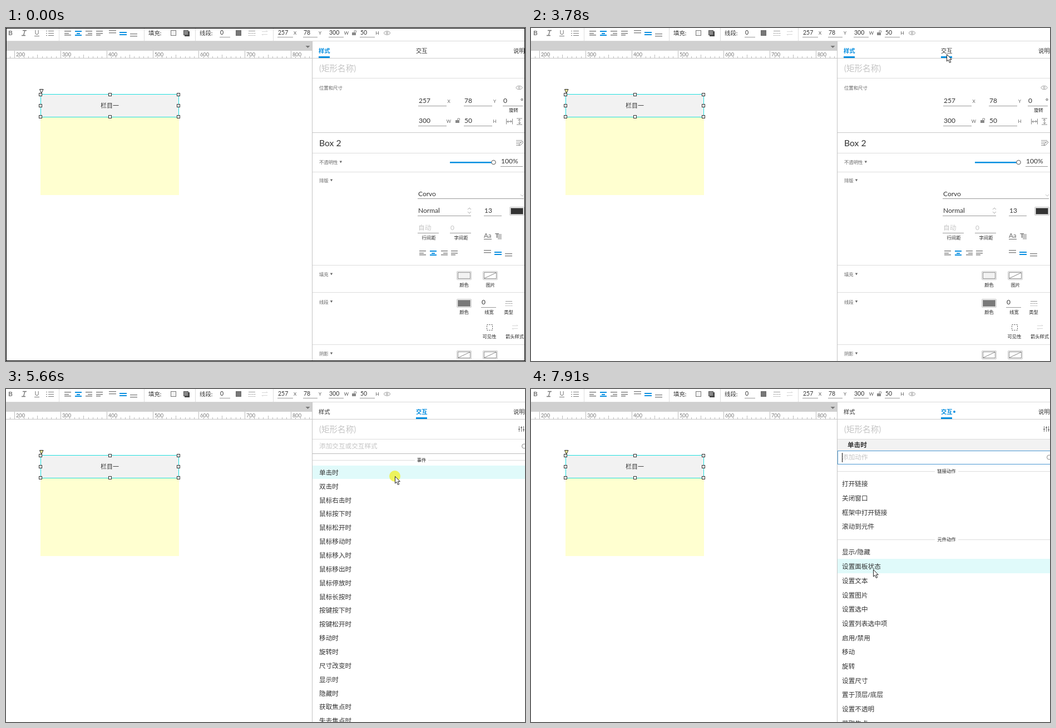
These frames come from a looping animation (933x600 px, 8 s). An HTML page with a canvas:

```html
<!DOCTYPE html>
<html lang="zh">
<head>
<meta charset="utf-8">
<title>交互面板</title>
<style>
html, body { margin: 0; width: 100%; height: 100%; overflow: hidden; background: #fff; }
canvas { display: block; }
</style>
</head>
<body>
<canvas id="stage" width="933" height="600"></canvas>
<script>
const c = document.getElementById('stage').getContext('2d');
const LOOP = 8000, BLUE = '#058ee0', DARK = '#333', GRAY = '#7a7a7a', PALE = '#c4c4c4', HOVER = '#e0fafa';
const CJK = '"Noto Sans CJK SC", "Noto Sans CJK", sans-serif';
const FONT = 'Lato, ' + CJK, LIST_FONT = '"Open Sans", ' + CJK;

// pointer path: time, x, y
const path = [
  [210, 330, 568], [500, 440, 400], [800, 540, 270], [1000, 610, 212], [1060, 667, 217],
  [1230, 667, 217], [1500, 692, 165], [1750, 740, 75], [1920, 761, 44], [2070, 759, 44],
  [2150, 759, 44], [2220, 757, 48], [2300, 755, 52], [2450, 755, 52], [2610, 747, 51],
  [2770, 747, 51], [2840, 747, 53], [2910, 747, 54], [3090, 747, 54], [3160, 747, 51],
  [3710, 747, 51], [3860, 748, 42], [4340, 748, 42], [4560, 741, 88], [4720, 735, 124],
  [4950, 735, 124], [5200, 722, 140], [5490, 699, 157], [5980, 699, 157], [6140, 656, 192],
  [6450, 634, 250], [6700, 618, 312], [6830, 615, 325]
];
const clicks = [[3940, 4090], [4870, 4950], [5660, 5740]];

const events = '单击时 双击时 鼠标右击时 鼠标按下时 鼠标松开时 鼠标移动时 鼠标移入时 鼠标移出时 鼠标停放时 鼠标长按时 按键按下时 按键松开时 移动时 旋转时 尺寸改变时 显示时 隐藏时 获取焦点时 失去焦点时'.split(' ');
const links = '打开链接 关闭窗口 框架中打开链接 滚动到元件'.split(' ');
const actions = '显示/隐藏 设置面板状态 设置文本 设置图片 设置选中 设置列表选中项 启用/禁用 移动 旋转 设置尺寸 置于顶层/底层 设置不透明 获取焦点'.split(' ');

function pointer(t) {
  if (t < path[0][0]) return null;
  const i = path.findIndex(k => k[0] > t);
  if (i < 0) return path[path.length - 1].slice(1);
  const [t0, x0, y0] = path[i - 1], [t1, x1, y1] = path[i];
  const f = (t - t0) / (t1 - t0);
  return [Math.round(x0 + (x1 - x0) * f), Math.round(y0 + (y1 - y0) * f)];
}

function box(x, y, w, h, color) { c.fillStyle = color; c.fillRect(x, y, w, h); }
function frame(x, y, w, h, color, fill) {
  if (fill) box(x, y, w, h, fill);
  c.strokeStyle = color; c.lineWidth = 1;
  c.strokeRect(x + .5, y + .5, w - 1, h - 1);
}
function line(x1, x2, y, color = '#d8d8d8') { box(x1, y, x2 - x1, 1, color); }
// text is centred vertically on y
function text(s, x, y, size, color = DARK, align = 'left', weight = 400, font = FONT) {
  c.font = `${weight} ${size}px ${font}`;
  c.textAlign = align; c.fillStyle = color;
  c.fillText(s, x, y + size * .37);
}
function poly(points, stroke, fill, width = 1, close = true) {
  c.beginPath();
  for (let i = 0; i < points.length; i += 2) c.lineTo(points[i], points[i + 1]);
  if (close) c.closePath();
  if (fill) { c.fillStyle = fill; c.fill(); }
  if (stroke) { c.strokeStyle = stroke; c.lineWidth = width; c.stroke(); }
}
function circle(x, y, r, stroke, fill, width = 1) {
  c.beginPath(); c.arc(x, y, r, 0, 7);
  if (fill) { c.fillStyle = fill; c.fill(); }
  if (stroke) { c.strokeStyle = stroke; c.lineWidth = width; c.stroke(); }
}
function round(x, y, w, h, r, stroke, fill) {
  c.beginPath(); c.roundRect(x + .5, y + .5, w - 1, h - 1, r);
  if (fill) { c.fillStyle = fill; c.fill(); }
  if (stroke) { c.strokeStyle = stroke; c.lineWidth = 1; c.stroke(); }
}
function field(s, x, y, w, size = 12, color = DARK, gap = 9) {
  text(s, x + 1, y, size, color);
  line(x, x + w, Math.floor(y + gap), '#999');
}
function eye(x, y) {
  c.beginPath(); c.ellipse(x, y, 5.5, 3.2, 0, 0, 7);
  c.strokeStyle = '#999'; c.lineWidth = 1; c.stroke();
  circle(x, y, 1.6, '#999');
}
function lock(x, y) {
  box(x - 4, y - 1, 7, 5, '#888');
  poly([x, y - 1, x, y - 4, x + 3.5, y - 4, x + 3.5, y - 1], '#888', null, 1, false);
}
function arrows(x, y) {
  poly([x - 5, y - 2.5, x + 5, y - 2.5, x + 3, y - 4.5], '#d6d6d6', null, 1, false);
  poly([x + 5, y + 2.5, x - 5, y + 2.5, x - 3, y + 4.5], '#d6d6d6', null, 1, false);
}
function dashes(x, y) {
  line(x - 6, x + 6, y - 5, '#999');
  for (let i = 0; i < 4; i++) box(x - 6 + i * 3.4, y - 1, 2, 1, '#888');
  for (let i = 0; i < 6; i++) box(x - 6 + i * 2.2, y + 3, 1, 1, '#888');
}
function aligns(xs, y) {
  const widths = [8, 6, 8, 12], shift = [0, 3, 4, 0];
  xs.forEach((x, k) => [-4, 0, 3].forEach((d, i) => {
    const short = i === 1;
    box(x + (short ? shift[k] : 0), y + d, short ? widths[k] : k === 3 && i === 2 ? 8 : 12,
      k === 1 ? 2 : 1.4, k === 1 ? BLUE : GRAY);
  }));
}
function valigns(xs, y) {
  xs.forEach((x, k) => [-2, 2].forEach(d =>
    box(x, y + (k - 1) * 3 + d, 13, k === 1 ? 2 : 1.3, k === 1 ? BLUE : GRAY)));
}
function swatch(x, y, color) {
  round(x, y, 27, 16, 1.5, '#c8c8c8', '#fff');
  frame(x + 2, y + 2, 23, 12, '#8c8c8c', color || '#fff');
  if (!color) poly([x + 3, y + 13, x + 24, y + 3], '#888', null, 1, false);
}
function small(s, x, y) { text(s, x, y, 8.3, '#222', 'center', 500); }
function heading(s, y) {
  text(s, 563, y, 8.4, '#666');
  const x = 566 + s.length * 8.4;
  poly([x, y - 2.5, x + 4.4, y - 2.5, x + 2.2, y + 1.5], null, '#666');
}

function toolbar() {
  text('B', 4, 9, 12, '#777', 'left', 700);
  poly([30, 4.5, 37, 4.5, 34, 4.5, 31.5, 13.5, 28, 13.5, 35, 13.5], '#777', null, 1.3, false);
  text('U', 55.5, 8, 11, '#777', 'center');
  line(51, 60, 14, '#777');
  for (const y of [5, 9, 13]) { box(72, y, 2, 1, GRAY); box(76, y, 10, 1, GRAY); }
  for (const x of [95, 248, 340, 480]) box(x, 0, 1, 23, '#ddd');
  aligns([105, 124, 143, 162], 9);
  valigns([185, 204, 223], 9);
  text('填充:', 256, 9.5, 10.4, DARK, 'left', 500);
  frame(296, 4, 10, 10, '#777', '#f2f2f2');
  box(321, 6, 9, 9, '#444'); frame(319, 4, 9, 9, '#555', '#888');
  text('线段:', 348, 9.5, 10.4, DARK, 'left', 500);
  field('0', 384, 8.5, 19, 10.5, DARK, 7.5);
  frame(413, 4, 10, 10, '#666', '#777');
  dashes(442, 10); arrows(465, 9);
  [['257', 488, 28, 'X', 519.5], ['78', 534, 26, 'Y', 564.5], ['300', 580, 27, 'W', 612], ['50', 636, 27, 'H', 667.5]]
    .forEach(([s, x, w, label, lx]) => {
      field(s, x, 8.5, w, 10.5, DARK, 7.5);
      text(label, lx, 9, 8, '#555', 'center');
    });
  lock(626, 9); eye(685, 9);
}

function workspace(first) {
  line(0, 933, 23);
  box(0, 24, 550, 17, '#d0d0d0');
  poly([538.5, 32, 546.5, 32, 542.5, 36], null, '#777');
  for (let i = -1; i < 65; i++) {
    const x = Math.round(15 + i * 8.285), big = i % 10 === 0;
    if (x < 0 || x > 549) continue;
    const h = big ? 13 : i % 5 === 0 ? 6 : 3;
    box(x, 54 - h, 1, h, '#bbb');
    if (big) text(String(200 + i * 10), x + 3, 48, 9.2, '#777');
  }
  line(0, 550, 54, '#c4c4c4');
  box(550, 24, 1, 576, '#c4c4c4');

  box(62, 160, 249, 141, '#ffffd0');
  frame(62, 119, 249, 42, '#1fdede', '#f2f2f2');
  text('栏目一', 186.5, 139.5, 11, DARK, 'center');
  for (const x of [62, 187, 310]) for (const y of [120, 140, 160])
    if (x !== 187 || y !== 140) frame(x - 3, y - 3, 6, 6, '#333', '#fff');
  poly([60.5, 110.5, 67, 110.5, 63.7, 117.5], '#222', first ? '#fff' : '#ffff99');
}

function tabs(page, hover) {
  [['样式', 562], ['交互', 737], ['说明', 912]].forEach(([s, x], i) => {
    const on = i === (page ? 1 : 0);
    text(s, x, 41, 10.3, on ? BLUE : DARK, 'left', on ? 700 : 400);
    if (on || (i === 1 && hover)) box(x, 51, 20, 3, BLUE);
  });
  if (page === 3) circle(761, 41, 2, null, BLUE);
  line(551, 933, 54, '#ccc');
  text('(矩形名称)', 563, 72.5, 14.6, PALE);
  line(551, 933, 90, '#ddd');
  if (page) [922, 926, 930].forEach((x, i) => {
    box(x, 67, 1, 10, '#777');
    box(x - 1, [72, 69, 73][i], 3, 1, '#555');
  });
}

function stylePage(nameHover) {
  text('位置和尺寸', 563, 108, 8.4, '#666');
  eye(922.5, 107.5);
  [['257', '78', 'X', 'Y', 131], ['300', '50', 'W', 'H', 167]].forEach(([a, b, la, lb, y]) => {
    field(a, 741, y, 51); field(b, 823, y, 51);
    text(la, 796, y + 1, 8, '#666', 'center');
    text(lb, 878.5, y + 1, 8, '#666', 'center');
  });
  field('0', 893, 131, 36);
  text('°', 925, 132, 12);
  small('旋转', 912.5, 147.5);
  lock(812, 167);
  for (const [x, turn] of [[905, 0], [923, 1]]) {
    c.save(); c.translate(x, 168.5); c.rotate(turn * Math.PI / 2);
    poly([-5.5, -5, -5.5, 5], '#888', null, 1, false);
    poly([5.5, -5, 5.5, 5], '#888', null, 1, false);
    poly([-2, -2, -4, 0, -2, 2, -4, 0, 4, 0, 2, -2, 4, 0, 2, 2], '#888', null, 1, false);
    c.restore();
  }
  line(551, 933, 188, '#c8c8c8');

  text('Box 2', 563, 207, 15.7);
  for (const y of [202, 205, 208, 211]) line(917, y < 206 ? 928 : 923, y, '#999');
  poly([922, 212, 923, 209, 928, 204, 930, 206, 925, 211], '#888', '#fff');
  line(551, 933, 225, '#ddd');
  if (nameHover) {
    box(551, 224, 363, 1.5, BLUE);
    poly([896, 208, 899, 211, 902, 208], BLUE, null, 1, false);
  }

  heading('不透明性', 242);
  box(798, 241, 75, 2.5, BLUE);
  circle(876.5, 242, 3.7, '#777', '#fff', 1.3);
  field('100%', 889, 240, 40);
  line(551, 933, 259, '#ddd');

  heading('排版', 275);
  field('Corvo', 740, 298.5, 191);
  poly([925, 300, 928, 303, 931, 300], '#bbb', null, 1, false);
  field('Normal', 740, 329, 96);
  poly([830, 327, 833, 324, 836, 327], '#aaa', null, 1, false);
  poly([830, 331, 833, 334, 836, 331], '#aaa', null, 1, false);
  field('13', 859, 329, 32);
  swatch(905, 322, '#333');
  field('自动', 740, 360, 38, 11.7, PALE);
  field('0', 798, 360, 38, 12, PALE);
  small('行间距', 760, 378); small('字间距', 818, 378);
  text('Aa', 859, 373.5, 11.5, '#666'); line(859, 873, 380, '#666');
  box(884, 371, 7, 10, '#c8c8c8');
  text('T', 879, 374, 12, '#777', 'left', 700);
  aligns([743, 762, 782, 800], 405);
  valigns([859, 878, 897], 405);
  line(551, 933, 427, '#ddd');

  heading('填充', 444);
  swatch(810, 438, '#f2f2f2'); swatch(857, 438);
  small('颜色', 823.5, 462.5); small('图片', 871, 462.5);
  line(551, 933, 476, '#ddd');

  heading('线段', 493.5);
  swatch(810, 488, '#797979');
  field('0', 854, 494, 27);
  dashes(904, 497);
  small('颜色', 823.5, 512); small('线宽', 868.5, 512); small('类型', 903.5, 512);
  c.setLineDash([2, 2]); frame(864, 534, 11, 11, '#444'); c.setLineDash([]);
  arrows(915, 539);
  small('可见性', 869, 556); small('箭头样式', 914.5, 556);
  line(551, 933, 570, '#ddd');

  heading('阴影', 587);
  swatch(810, 581); swatch(857, 581);
}

function startPage() {
  box(563, 108, 368, 23, BLUE);
  text('新建交互', 747, 119.5, 11.8, '#fff', 'center', 500);
  circle(743, 164, 11, '#888', null, 1.5);
  circle(743, 164, 6.5, '#888', null, 1.5);
  poly([743, 162, 747.5, 179, 751, 175.5, 757, 181.5, 761, 177.5, 755, 171.5, 759, 168], '#444', '#fff', 1.6);
  text('点击上方按钮开始添加新的交互', 747, 199.5, 9.95, '#808080', 'center');
  line(563, 931, 226, '#ccc');
  text('常用交互', 747, 249, 8.3, '#555', 'center');
  ['单击时 , 打开链接', '单击时 , 设置可见性', '鼠标悬停交互样式'].forEach((s, i) => {
    round(575, 262 + i * 25, 344, 18, 7, '#999', '#fff');
    text(s, 747, 271 + i * 25, 10, '#222', 'center');
  });
  round(911, 578, 20, 18, 2, null, '#ececec');
  frame(919, 582, 8, 6, '#555', '#ececec');
  frame(915, 586, 8, 6, '#555', '#ececec');
}

function search(y) {
  circle(931.5, y, 4, '#888');
}
function section(s, y, gap) {
  line(551, 747 - gap, y, '#ddd'); line(747 + gap, 933, y, '#ddd');
  small(s, 747, y);
}
function list(items, x, y, step, p) {
  items.forEach((s, i) => {
    const mid = y + i * step;
    const top = Math.floor(mid - step / 2), bottom = Math.floor(mid + step / 2);
    if (p[1] >= top && p[1] < bottom) box(551, top, 382, bottom - top, HOVER);
    text(s, x, mid, 11.65, DARK, 'left', 400, LIST_FONT);
  });
}

function eventPage(p) {
  text('添加交互或交互样式', 563, 103, 11.65, PALE);
  search(103);
  line(551, 933, 116, '#bbb');
  section('事件', 128, 12);
  list(events, 563, 150.5, 24.86, p);
}

function actionPage(p, t) {
  box(551, 91, 382, 20, '#f2f2f2');
  text('单击时', 569, 101, 11.6, DARK, 'left', 700);
  frame(551, 111, 390, 25, '#4a98d3', '#fff');
  text('添加动作', 559, 123, 11.65, PALE);
  const blink = t >= 6300 && t < 6830 || t >= 7380 && t < 7910;
  if (!blink) box(559, 115, 1, 17, '#111');
  search(123);
  section('链接动作', 148, 21);
  list(links, 559, 170.8, 25.7, p);
  section('元件动作', 271, 21);
  list(actions, 559, 294.1, 25.7, p);
}

function drawPointer([x, y], beam) {
  if (beam) {
    box(x - 3, y - 6, 3, 1, '#111'); box(x + 1, y - 6, 3, 1, '#111');
    box(x, y - 5, 1, 11, '#111');
    box(x - 3, y + 6, 3, 1, '#111'); box(x + 1, y + 6, 3, 1, '#111');
    return;
  }
  const shape = [0, 0, 0, 12.5, 2.8, 10, 5, 15, 7.2, 14, 5, 9.2, 8.8, 9.2];
  poly(shape.map((v, i) => v + (i % 2 ? y : x) + .5), '#222', '#fff');
}

function draw(t) {
  const page = t < 4090 ? 0 : t < 4950 ? 1 : t < 5740 ? 2 : 3;
  const p = pointer(t), at = p || [0, 0], [x, y] = at;
  const nameHover = page === 0 && x > 551 && y >= 190 && y < 225;
  box(0, 0, 933, 600, '#fff');
  toolbar();
  workspace(t < 70);
  tabs(page, x >= 737 && x <= 757 && y > 33 && y < 54);
  [() => stylePage(nameHover), startPage, () => eventPage(at), () => actionPage(at, t)][page]();
  if (clicks.some(([a, b]) => t >= a && t < b)) circle(x, y, 10, null, 'rgba(240,240,40,.75)');
  if (p) drawPointer(p, nameHover);
  if (t < 70) frame(0, 0, 933, 600, '#000');
}

function tick() {
  draw(performance.now() % LOOP);
  requestAnimationFrame(tick);
}
tick();
</script>
</body>
</html>
```
